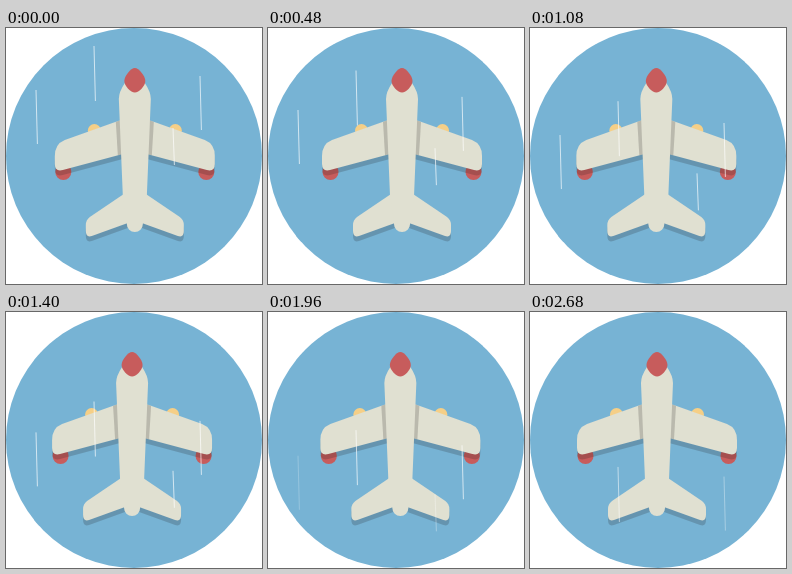
An HTML page that plays this animation: 256 by 256 pixels, repeating every 2720 ms.

```html
<!DOCTYPE html>
<html>
<head>
<meta charset="utf-8">
<title>Airplane</title>
<style>
html, body { margin: 0; width: 100%; height: 100%; overflow: hidden; background: #fff; }
svg { display: block; width: 100vw; height: 100vh; }
</style>
</head>
<body>
<svg viewBox="0 0 256 256">
  <defs>
    <g id="half">
      <path d="M-14 92 L-70 112 Q-80 116 -80 128 V136 Q-80 144 -72 142 L-12 126Z"/>
      <path d="M-11 166 L-45 189 Q-49 192 -49 197 V203 Q-49 210 -43 208 L-7 195Z"/>
    </g>
    <g id="side">
      <circle cx="-40.5" cy="102.5" r="6.5" fill="#f5cf87"/>
      <circle cx="-71.5" cy="144" r="8" fill="#c75c5c"/>
      <use href="#half" y="5" fill="#231f20" opacity=".2"/>
      <use href="#half" fill="#e0e0d1"/>
      <path d="M-14 92 L-19 94 L-17 127.2 L-12 126Z" fill="#231f20" opacity=".2"/>
    </g>
  </defs>
  <circle cx="128" cy="128" r="128" fill="#77b3d4"/>
  <g id="plane">
    <use href="#side"/>
    <use href="#side" transform="scale(-1 1)"/>
    <path d="M0 42 Q-4 42 -10 55 Q-16 64 -16 71 L-12 168 L-8 196 A8 8 0 0 0 8 196 L12 168 L16 71 Q16 64 10 55 Q4 42 0 42Z" fill="#e0e0d1"/>
    <path d="M0 40 C4 40 10.5 48 10.5 53 C10.5 58 4 64.5 0 64.5 C-4 64.5 -10.5 58 -10.5 53 C-10.5 48 -4 40 0 40Z" fill="#c75c5c"/>
  </g>
  <g id="streaks" stroke="#fff" stroke-width=".9"></g>
</svg>
<script>
const LOOP = 2720, STEP = 40;
const plane = document.getElementById('plane');
const layer = document.getElementById('streaks');

// sway turning points: [ms, x]
const sway = [[-250, 126], [380, 134.3], [1240, 125.6], [2300, 134.4], [2880, 124.3]];

// speed in px/s; fade is the start and end of fading in ms
const streaks = [
  { x: 30, y: 62, len: 54, speed: 41.7, fade: [1640, 2120] },
  { x: 88, y: 18, len: 55, speed: 51.1, fade: [2500, 3400] },
  { x: 194, y: 48, len: 54, speed: 43.5, fade: [2150, 3250] },
  { x: 167, y: 100, len: 37, speed: 42, fade: [1700, 2200] }
];

for (const s of streaks) {
  s.el = document.createElementNS('http://www.w3.org/2000/svg', 'path');
  s.el.setAttribute('d', `M0 0 L1.4 ${s.len}`);
  layer.append(s.el);
}

const clamp = v => Math.max(0, Math.min(1, v));

function swayAt(t) {
  const i = sway.findIndex(k => k[0] > t);
  const [t0, x0] = sway[i - 1], [t1, x1] = sway[i];
  return x0 + (x1 - x0) * (1 - Math.cos(Math.PI * (t - t0) / (t1 - t0))) / 2;
}

function draw(t) {
  plane.setAttribute('transform', `translate(${swayAt(t)} 0)`);
  for (const s of streaks) {
    const [a, b] = s.fade;
    s.el.setAttribute('transform', `translate(${s.x} ${s.y + s.speed * t / 1000})`);
    s.el.setAttribute('opacity', 0.75 * clamp((b - t) / (b - a)));
  }
}

const start = performance.now();
function tick() {
  const t = (performance.now() - start) % LOOP;
  draw(Math.floor(t / STEP) * STEP);
  requestAnimationFrame(tick);
}
tick();
</script>
</body>
</html>
```
